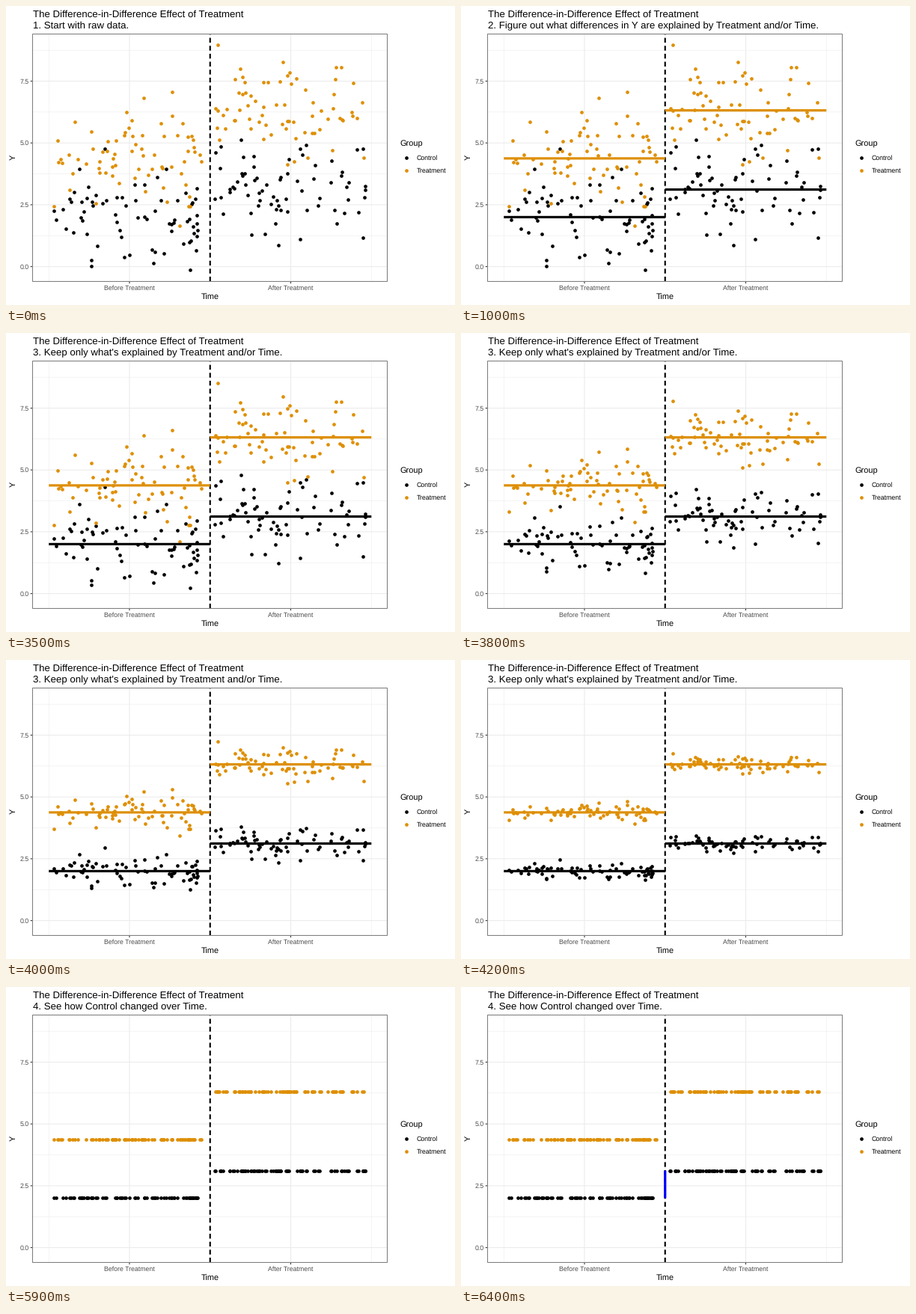
A matplotlib script that plays this animation: 600x400 px, repeating every 8 s.

```python
import numpy as np
import matplotlib.pyplot as plt
from matplotlib.animation import FuncAnimation
from matplotlib.patches import Rectangle

W, H, DPI = 600, 400, 100
STEP = 100                      # ms per frame
FRAMES = 80
PX = 72 / DPI                   # points per pixel

BLACK, ORANGE = "#000000", "#DE8F05"
GRID, GREY, DARK, AXIS_TEXT = "#EBEBEB", "#7F7F7F", "#333333", "#4D4D4D"
LEFT, RIGHT, TOP, BOTTOM = 35.5, 509.5, 37.5, 368.5

TITLE = "The Difference-in-Difference Effect of Treatment"
STAGES = [
    (0, "1. Start with raw data."),
    (500, "2. Figure out what differences in Y are explained by Treatment and/or Time."),
    (3200, "3. Keep only what's explained by Treatment and/or Time."),
    (5900, "4. See how Control changed over Time."),
]
LINES_ON, SHRINK, SHRINK_END, LINES_OFF, GAP_ON = 1000, 3100, 4600, 5900, 6400

# Color, time period (0 before, 1 after), mean Y and the extreme points (time, Y)
GROUPS = [
    (BLACK, 0, 2.0, [(0.70, 4.75), (1.76, -0.15), (0.53, 0.0)]),
    (BLACK, 1, 3.115, [(2.39, 5.1), (2.85, 0.85), (3.90, 4.75)]),
    (ORANGE, 0, 4.375, [(1.53, 7.05), (1.18, 6.8), (1.63, 1.65)]),
    (ORANGE, 1, 6.317, [(2.10, 8.95), (2.91, 8.27), (2.96, 4.1)]),
]

plt.rcParams["font.family"] = "Liberation Sans"
plt.rcParams["text.hinting"] = "none"
plt.rcParams["path.snap"] = False


def to_x(t):
    """Pixel column for time 0 (start), 2 (treatment) to 4 (end)."""
    return 57.25 + 107.75 * t


def to_y(v):
    return 348.6 - 33.08 * v


fig = plt.figure(figsize=(W / DPI, H / DPI), dpi=DPI, facecolor="white")
ax = fig.add_axes([0, 0, 1, 1])
ax.set_xlim(0, W)
ax.set_ylim(H, 0)
ax.axis("off")


def line(xs, ys, color, width, z, **kw):
    return ax.plot(xs, ys, color=color, lw=width * PX, zorder=z,
                   solid_capstyle="butt", **kw)[0]


def label(x, y, s, size, color="black", **kw):
    return ax.text(x, y, s, fontsize=size * PX, color=color, **kw)


def dots(x, y, color):
    return ax.plot(x, y, "o", color=color, ms=4.7 * PX, mew=0, zorder=3)[0]


def cloud(period, mean, extremes, rng, count=69):
    """Normal noise around the mean, jittered over the period."""
    t = 2 * period + rng.uniform(0.06, 1.94, count)
    noise = np.clip(rng.normal(0, 0.95, count), -1.9, 1.9)
    et, ev = np.array(extremes).T
    x = to_x(np.r_[et, t])
    y = to_y(np.r_[ev, mean + noise - noise.mean()])
    return x - 0.5, y - 0.5


# Grid, ticks and frame
for k in range(5):
    x = to_x(k)
    line((x, x), (TOP, BOTTOM), GRID, 1.07 if k % 2 else 0.53, 1)
for k in range(8):
    y = to_y(1.25 * k)
    line((LEFT, RIGHT), (y, y), GRID, 0.53 if k % 2 else 1.07, 1)
    if k % 2 == 0:
        line((LEFT - 2.75, LEFT), (y, y), DARK, 1.07, 2)
        label(30.7, y + 3.2, f"{1.25 * k:.1f}", 8.8, AXIS_TEXT, ha="right")
for k, s in ((1, "Before Treatment"), (3, "After Treatment")):
    x = to_x(k)
    line((x, x), (BOTTOM, BOTTOM + 2.75), DARK, 1.07, 2)
    label(x, 380, s, 8.8, AXIS_TEXT, ha="center")
ax.add_patch(Rectangle((LEFT, TOP), RIGHT - LEFT, BOTTOM - TOP, fill=False,
                       ec=GREY, lw=1.07 * PX, zorder=8))
label(272.5, 392.7, "Time", 11, ha="center")
label(10, 202.7, "Y", 11, rotation=90, ha="center", va="center")

# Legend
label(526, 187, "Group", 11)
for y, color, s in ((202.5, BLACK, "Control"), (219.5, ORANGE, "Treatment")):
    dots([534.5], [y], color)
    label(548.7, y + 3.5, s, 8.8)

# Title and changing parts
label(35.5, 15, TITLE, 13.2)
subtitle = label(35.5, 30, "", 13.2)
mid = to_x(2)
line((mid, mid), (BOTTOM, TOP), "black", 2.13, 4,
     linestyle=(0, (3, 2)), dash_capstyle="butt")
gap = line((mid, mid), (to_y(GROUPS[0][2]), to_y(GROUPS[1][2])), "blue", 3.2, 6)

rng = np.random.default_rng(12)
clouds, means = [], []
for color, period, mean, extremes in GROUPS:
    x, y = cloud(period, mean, extremes, rng)
    clouds.append((dots(x, y, color), y, to_y(mean)))
    ends = to_x(2 * period), to_x(2 * period + 2)
    means.append(line(ends, (to_y(mean),) * 2, color, 3.2, 5))


def update(i):
    t = i * STEP
    subtitle.set_text([s for start, s in STAGES if t >= start][-1])
    p = np.clip((t - SHRINK) / (SHRINK_END - SHRINK), 0, 1)
    ease = (1 - np.cos(np.pi * p)) / 2
    for points, y, center in clouds:
        points.set_ydata(y + (center - y) * ease)
    for m in means:
        m.set_visible(LINES_ON <= t < LINES_OFF)
    gap.set_visible(t >= GAP_ON)
    return []


anim = FuncAnimation(fig, update, frames=FRAMES, interval=STEP,
                     repeat=True, repeat_delay=0)
plt.show()
```
